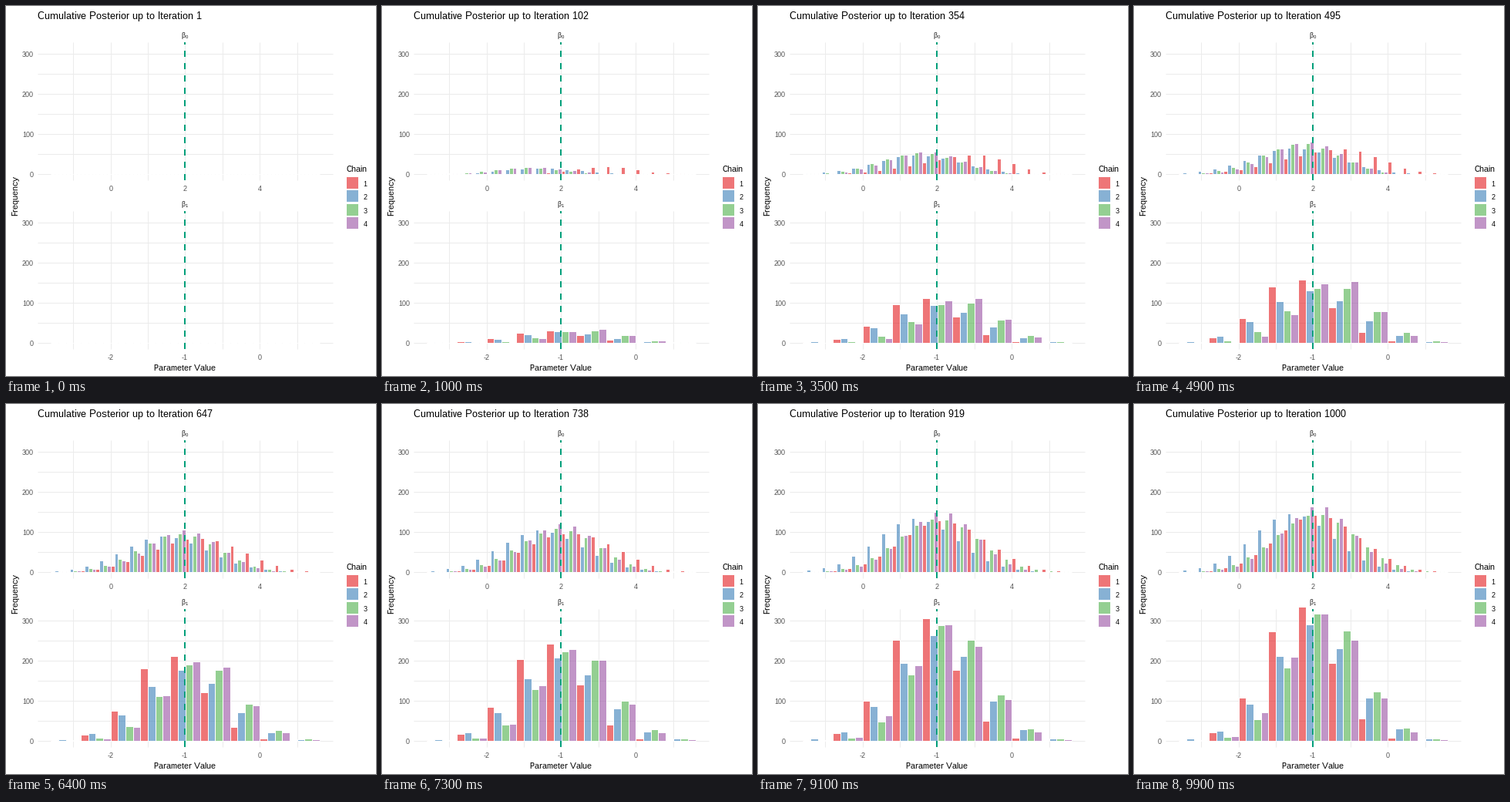
These frames come from a looping animation (480x480 px, 10000 ms). A matplotlib script:

```python
from math import erf, sqrt

import matplotlib.pyplot as plt
import numpy as np
from matplotlib.animation import FuncAnimation
from matplotlib.colors import to_rgba
from matplotlib.patches import Rectangle

plt.rcParams.update({
    "font.family": ["Liberation Sans", "DejaVu Sans"],
    "text.hinting": "native",
    "text.hinting_factor": 1,
})

SIZE, FRAMES, DRAWS = 480, 100, 1000
LEFT, RIGHT = 41, 424
BIN_LEFT, BIN_SPAN, BIN_WIDTH = 58.4, 348.2, 0.4
PX_PER_COUNT = 0.5195
COLORS = [to_rgba(c, 0.6) for c in ("#E41A1C", "#377EB8", "#4DAF4A", "#984EA3")]
GRID, TICK, TRUTH = "#EBEBEB", "#4D4D4D", "#029F7A"
GRID_X = (87, 136, 184, 232, 281, 329, 378)

# Each chain wanders: in every phase its draws follow Normal(mean, sd)
PHASES = (0, 193, 495, DRAWS)
BETA0 = [
    [(3.35, 0.84), (2.05, 1.17), (2.06, 0.90)],
    [(1.49, 1.04), (1.56, 1.32), (1.45, 0.98)],
    [(1.03, 0.95), (1.91, 0.89), (2.40, 1.01)],
    [(1.11, 0.91), (1.97, 0.84), (2.21, 0.87)],
]
BETA1 = [
    [(-1.08, 0.53), (-1.15, 0.43), (-1.06, 0.44)],
    [(-0.97, 0.57), (-1.01, 0.61), (-0.95, 0.49)],
    [(-0.72, 0.49), (-0.87, 0.55), (-0.93, 0.42)],
    [(-0.72, 0.45), (-0.82, 0.47), (-1.09, 0.45)],
]

# 72 dpi makes one point equal one pixel
fig = plt.figure(figsize=(SIZE / 72, SIZE / 72), dpi=72, facecolor="white")
ax = fig.add_axes([0, 0, 1, 1])
ax.set(xlim=(0, SIZE), ylim=(SIZE, 0))
ax.axis("off")


def label(x, y, text, size=9, color="black", **kw):
    return ax.text(x, y, text, size=size, color=color, va="baseline", **kw)


def line(xs, ys, color, width, **kw):
    ax.plot(xs, ys, color=color, lw=width, snap=True,
            solid_capstyle="butt", dash_capstyle="butt", **kw)


def box(x, y, width, height, color):
    return ax.add_patch(Rectangle((x, y), width, height, facecolor=color,
                                  edgecolor="white", lw=1, snap=True, zorder=2))


def bin_shares(edges, mean, sd):
    """Share of a normal distribution that falls in each bin."""
    return np.diff([0.5 * erf((e - mean) / (sd * sqrt(2))) for e in edges])


class Panel:
    """One facet: grid, true value line and dodged histogram bars."""

    def __init__(self, top, index, ticks, first_edge, bins, chains):
        bottom = top + 179
        self.zero = top + 171
        self.draw_frame(top, bottom, index, ticks)
        edges = first_edge + BIN_WIDTH * np.arange(bins + 1)
        step = BIN_SPAN / bins
        self.chains = []
        for i, phases in enumerate(chains):
            shares = np.array([bin_shares(edges, *p) for p in phases])
            bars = [box(BIN_LEFT + step * (k + i / 4), self.zero, step / 4, 0,
                        COLORS[i]) for k in range(bins)]
            self.chains.append((bars, shares))

    def draw_frame(self, top, bottom, index, ticks):
        for x in GRID_X:
            line([x, x], [top, bottom], GRID, 1, zorder=1)
        for count in range(0, 301, 50):
            y = round(self.zero - count * PX_PER_COUNT)
            line([LEFT, RIGHT], [y, y], GRID, 1, zorder=1)
            if count % 100 == 0:
                label(36, y + 4, count, color=TICK, ha="right")
        for x, tick in zip(GRID_X[1::2], ticks):
            label(x, bottom + 14, tick, color=TICK, ha="center")
        line([232, 232], [bottom, top], TRUTH, 2, ls=(0, (4, 4)), zorder=3)
        label(227, top - 6, "β", color="#1A1A1A")
        label(233, top - 5, index, size=6, color="#1A1A1A")

    def update(self, draw):
        spent = np.clip(draw - np.array(PHASES[:-1]), 0, np.diff(PHASES))
        for bars, shares in self.chains:
            for bar, count in zip(bars, spent @ shares):
                height = round(count) * PX_PER_COUNT
                bar.set_y(self.zero - height)
                bar.set_height(height)


beta0 = Panel(47, "0", ("0", "2", "4"), -1.6, 18, BETA0)
beta1 = Panel(266, "1", ("-2", "-1", "0"), -2.8, 9, BETA1)

title = label(41, 17, "", size=13)
label(232, 473, "Parameter Value", size=11, ha="center")
label(15, 246, "Frequency", size=11, ha="center", rotation=90,
      rotation_mode="anchor")
label(441, 215, "Chain", size=11)
for i, color in enumerate(COLORS):
    y = 221 + 17.28 * i
    box(441, y, 16, 16, color)
    label(463.5, y + 13, i + 1)


def update(frame):
    draw = round(1 + frame * (DRAWS - 1) / (FRAMES - 1))
    title.set_text(f"Cumulative Posterior up to Iteration {draw}")
    beta0.update(draw)
    beta1.update(draw)


anim = FuncAnimation(fig, update, frames=FRAMES, interval=100,
                     repeat=True, repeat_delay=0)
plt.show()
```
